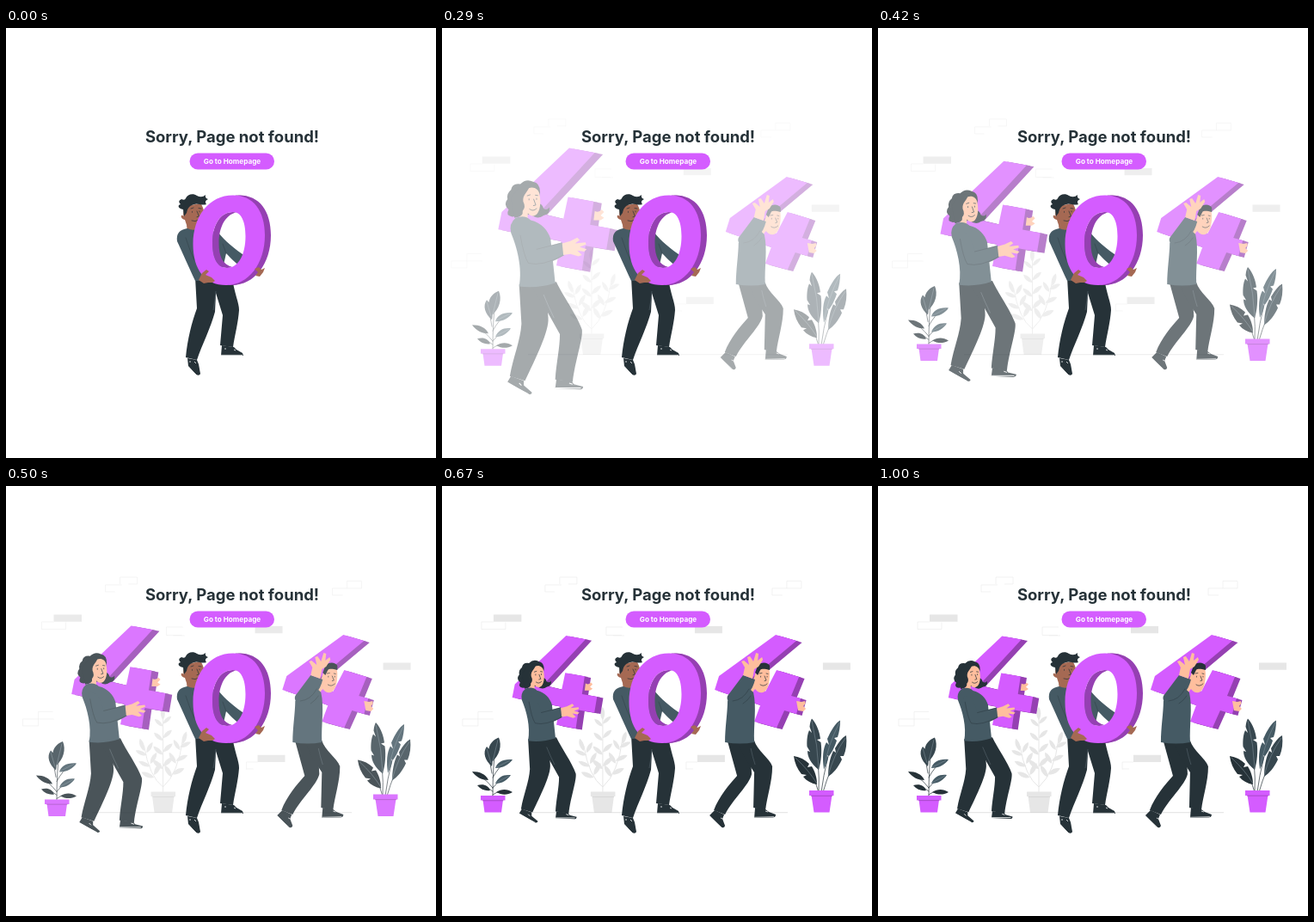
Animation of 500x500 px, one loop 1040 ms. Source, as an HTML page:

```html
<!DOCTYPE html>
<html lang="en">
<head>
<meta charset="utf-8">
<title>Page not found</title>
<style>
  html, body { margin: 0; width: 100%; height: 100%; overflow: hidden; background: #fff; }
  svg { display: block; width: 100vw; height: 100vh; }
  text { font-family: Inter, "Open Sans", sans-serif; font-weight: 700; text-anchor: middle; }
  .pink { fill: #d45cff; }
  .side { fill: #9540b2; }
  .dark { fill: #263238; }
  .knit { fill: #455a64; }
  .fold { fill: #37474f; }
  .skin { fill: #ffbe9d; }
  .brown { fill: #a56953; }
  .grey { fill: #e6e6e6; }
  .line { fill: none; stroke: #263238; stroke-width: .7; stroke-linecap: round; }
  .thin { fill: none; stroke: #e9e9e9; stroke-width: .6; }
  .vein { fill: none; stroke: #8797a0; stroke-width: .5; }
  .lace { fill: none; stroke: #fff; stroke-width: .8; }
</style>
</head>
<body>
<svg viewBox="0 0 500 500">
  <defs>
    <path id="four-a" d="M144 177L166 181 118 233 139 238 143 219 165 223 162 243 179 246 176 264 158 261 155 282 133 278 137 257 83 247 86 232Z"/>
    <path id="four-b" d="M387 173L411 180 350 231 375 239 388 214 414 222 405 244 416 247 411 265 397 261 388 281 362 274 369 255 316 237 321 221Z"/>
    <path id="zero" d="M264 194.5C288 194.5 301 213 301 241C301 274 282 299 256 299C231 299 217.5 281 217.5 251C217.5 219 236 194.5 264 194.5Z
      M264 214C249 214 240 229 240 250C240 268 246 279 257 279C270 279 278.5 264 278.5 242C278.5 224 273 214 264 214Z"/>
    <path id="rim" d="M264 194.5C288 194.5 301 213 301 241C301 274 282 299 256 299C272 290 287 270 287 241C287 217 279 202 264 194.5Z"/>
  </defs>

  <g id="scenery" class="fade">
    <path class="thin" d="M140 115H121v8h11M138 114v-8h20v8h-10M61 158H47v8.500h28v-8M43 271H25v8h18M43 271v-8.500h17M61 271h-18v8
      M211 164h-19v9.500h18M200 174h13M403 119h-18v8h12M402 119v-8.500h17M403 119h16v-8M298 321h-13v8.500M285 329h8"/>
    <path class="grey" d="M61 149.500h32.500v8.300H61ZM295 163h32v8.300h-32ZM444 205.500h32v8.300h-32ZM298 312.800h32v8.300h-32Z"/>
    <g id="shrub" class="grey">
      <path fill="none" stroke="#e6e6e6" d="M188 357V262M188 350Q172 338 166 302M188 350Q206 334 211 294"/>
      <path d="M174 355.500h28.500v5.500H201L198.500 380H178L175.500 361H174Z"/>
      <path d="M176 361.500h25" stroke="#cfcfcf" stroke-width=".6"/>
    </g>
  </g>
  <path class="fade thin" style="stroke:#cfcfcf" d="M100 379.700H402"/>

  <g id="plants" class="fade">
    <path class="line" d="M59 360Q59 325 62 305M59 350Q50 339 44 336M59 354Q52 348 46 348M59 338Q66 325 74 320M59 350Q66 341 74 338M59 358Q67 352 76 354M58 333Q56 320 54 314"/>
    <path class="fold" d="M58 320C51 308 54 296 66 291.500C70 301 67 312 58 320ZM58 325C50 318 47 309 52 302C58 308 60 316 58 325Z"/>
    <path class="knit" d="M62 327C64 320 71 316 82 317C78 323 71 327 62 327ZM62 345C65 337 72 334 80 335C76 341 70 345 62 345Z"/>
    <path class="dark" d="M54 341C47 341 40 338 35 331C44 331 51 334 54 341ZM56 353C51 354 45 352 41 347C48 345 54 347 56 353ZM63 355C69 351 76 351 82 355C75 359 69 358 63 355Z"/>
    <path class="vein" d="M59 319L65 294M57 321L52 304M63 326L79 318M63 344L78 336"/>
    <path class="pink" d="M45 359h28.500v5.500H45ZM47.500 364H71L69 378.500H49.500Z"/>
    <path class="line" style="stroke:#9540b2" d="M47.500 364.700H71"/>
    <path class="line" d="M438 355Q440 325 431 275M441 355Q446 315 461 277M443 355Q450 330 468 293M438 355Q432 330 411 315"/>
    <path class="fold" d="M438 329C429 322 425 314 425 307L428 308 424.500 302C424 294 425 287 427 283L430 286 427.500 279C428 274 429 271 430 269.500C436 276 439 285 440 293L436 294 440.500 297C442 308 441 319 438 329Z"/>
    <path class="knit" d="M444 328C442 315 443 304 447 297L450 300 448 293C452 284 457 275 463 271.500C463 279 462 285 460 291L456 292 459 295C456 304 453 309 450 313L448 312 449 315C448 320 446 325 444 328Z"/>
    <path class="fold" d="M449 337C449 326 451 315 455 307L458 309 457 304C462 296 466 291 470 289C471 298 470 306 467 313L463 313 465 317C461 326 455 333 449 337Z"/>
    <path class="dark" d="M436 346C430 345 424 342 420 337L424 335 418 334C413 328 410 321 409 313C416 314 422 317 427 322L425 326 430 325C434 332 436 338 436 346Z"/>
    <path class="vein" d="M438 328Q437 300 430 272M444 328Q448 302 462 274M449 336Q455 312 469 292M436 345Q427 330 411 315"/>
    <path class="pink" d="M427 353h28.500v6H427ZM429.500 358.500h24L450.500 378.500h-18Z"/>
    <path class="line" style="stroke:#9540b2" d="M429.500 359.200h24"/>
  </g>

  <g id="woman" class="fade">
    <g class="side"><use href="#four-a" x="7" y="1.500"/><use href="#four-a" x="3.500" y=".7"/></g>
    <use href="#four-a" class="pink"/>
    <path class="dark" d="M95 236Q89 235 92 230Q87 226 91 221Q90 216 94 213Q95 207 102 208Q107 203 113 206Q119 207 119 215L117 224Q121 225 122 229Q125 231 127 228Q128 234 122 235Q117 239 111 234Z"/>
    <path class="skin" d="M107 213C111 209 118 211 118.500 217C120 224 119 231 116 234C113 236.500 110 235 108.500 233L108 241 100 240 104 230C102 224 103 217 107 213Z"/>
    <path class="dark" d="M110 210C107 217 104 217 104.500 223Q107 228 104 231Q105 236 97 237L94 220 103 208Z"/>
    <path class="line" d="M109.500 220.700v.9M116 220.300v.9M113.500 221l1.800 5-2 .5M110 229.500Q113 232 116 229M108 218l2.500-.8M115 217.500l2 .3"/>
    <path class="dark" d="M101 294L124 294 126 323C127 334 115 358 106 377L93 373C96 356 102 343 103 328Z"/>
    <path class="dark" d="M110 294L133 292C138 303 151 321 155 333C156 341 149 360 147 378L132 376C133 361 136 349 136 337L122 312Z"/>
    <path class="vein" d="M122 303Q126 313 131 323" opacity=".6"/>
    <path class="knit" d="M98 237Q106 234 111 239C120 241 126 248 128 255L132 293Q117 298 101 296C104 280 99 262 94 250Q92 242 98 237Z"/>
    <path class="knit" d="M101 245C110 244 113 253 116 264L138 258 140 269C129 276 115 280 109 277C105 272 102 260 99 252Z"/>
    <path class="line" d="M102 252Q105 270 109 276Q121 279 139 269M116 264L136 259" opacity=".6"/>
    <path class="skin" d="M138 259L145 257 151 254 153 256 149 259 158 258 158.500 260 153 262 159 264 157 266 151 265 155 269 152 270 145 268 139 269ZM166 231Q169 233 172 230L174 232 171 235 174 237 171 239 165 239Z"/>
    <path class="dark" d="M94 373L105 377 105 381 112 387Q112 389 109 388.500L91 378Z"/>
    <path class="dark" d="M133 376L146 377 148 380 156 382Q156 384.500 153 384.500L132 383.500Z"/>
    <path class="lace" d="M91 379L109 388.500M132 383.200H154M101 379l2 2M144 379l3 1"/>
  </g>

  <g id="carrier">
    <path class="dark" d="M220 290L245 290 243 330C238 349 228 368 222 386L209 383C211 362 216 342 222 326Z"/>
    <path class="dark" d="M239 292L264 296C266 309 271 320 271 328C270 343 266 357 264 371L249 369 252 334Z"/>
    <path class="vein" d="M244 306Q243 318 241 328" opacity=".6"/>
    <path class="brown" d="M209 207C206 212 206 216 206.500 219C203 215 202 222 208 223L210 229 211 238 224 238 229 229C233 220 230 208 226 204Z"/>
    <path class="dark" d="M207 219L206 211C200 210 199 206 203 205Q199 201 204 199Q208 201 209 198C211 193 218 192 222 195Q228 198 232 194Q231 198 235 199Q230 201 233 205C227 207 223 203 219 205C214 206 211 209 210 215Z"/>
    <path class="line" d="M216.500 213.500v.8M225 213v.8M222 213l2.500 6-2.500 .7M215 210l3-1M224 209.500l3 .5M216 224Q220 226 224 223"/>
    <path class="knit" d="M211 233Q217 236 222 234L246 237C255 248 266 257 279 266L291 277 285 287C275 280 264 271 256 262L249 293 220 294C213 279 205 261 199 248Q197 235 211 233Z"/>
    <path class="line" d="M209 244Q213 257 219 270M256 262L252 251" opacity=".5"/>
    <path class="dark" d="M211 384L222 386 224 391 226 402Q225 405 221 403L212 393Z"/>
    <path class="dark" d="M251 369L265 371 268 374 275 378 276 381 250 381Z"/>
    <path class="lace" d="M211 393L222 404M250 380.400H275M219 388l2 2M254 373h2M265 374l2 1M213 388h2"/>
    <g class="side" fill-rule="evenodd">
      <use href="#rim" x="7"/><use href="#rim" x="5"/><use href="#rim" x="2.500"/>
      <path d="M264 214C249 214 240 229 240 250C240 268 246 279 257 279Q260 279 263 278C252 275 247.500 266 247.500 250C247.500 232 255 217 268 214.600Q266 214 264 214Z"/>
    </g>
    <use href="#zero" class="pink" fill-rule="evenodd"/>
    <path class="brown" d="M224 293L228 285 233 281 236 283 232 287 239 290 243 294 240 296 235 296 230 297ZM289 280L294 278 297 281 301 279 299 284 295 289 290 288 293 284Z"/>
  </g>

  <g id="lifter" class="fade">
    <g class="side"><use href="#four-b" x="6.500" y="2"/><use href="#four-b" x="3.200" y="1"/></g>
    <use href="#four-b" class="pink"/>
    <path class="dark" d="M331 297L357 297 359 335C356 348 338 363 328 382L315 377C321 361 333 347 342 337Z"/>
    <path class="dark" d="M342 297L362 296C365 307 380 317 383 326C383 344 377 360 375 377L361 374 362 333 351 316Z"/>
    <path class="vein" d="M358 305Q360 315 363 324" opacity=".6"/>
    <path class="skin" d="M367 208C374 205 380 210 380 218C380 226 379 235 374 239C370 242 365 239 363 236L359 241 353 233 361 225Z"/>
    <path class="dark" d="M363 217L366 209C370 204 378 205 380 209L380 214C375 213 371 212 369 214L366 220Z"/>
    <path class="line" d="M369.500 221.200v.9M377 221.200v.9M374 221l2 5-2 .6M369 231Q373 234 377 230M368 218l3-.5M376 218l2 .5"/>
    <path class="knit" d="M342 231Q355 233 361 240C365 258 361 278 362 298Q346 301 328 298C328 281 331 263 331 250Z"/>
    <path class="knit" d="M349 220L363 225C360 238 351 248 341 252C333 253 329 249 331 244Z"/>
    <path class="line" d="M337 250Q349 249 356 236M349 253Q355 249 358 244" opacity=".6"/>
    <path class="skin" d="M349 220L351 211 347 204 350 203 356 208 354 199 357 198 361 204 364 194 367 195 366 203 371 199 372 202 367 210 362 213 360 224ZM411 250L417 251 421 250 421.500 253 419 256 422 259 419 262 413 261Z"/>
    <path class="dark" d="M316 377L327 382 325 387 328 395Q327 398.500 323 396.500L310 383Z"/>
    <path class="dark" d="M363 374L375 376 379 379 387 382Q387 385 384 385.500L362 386Z"/>
    <path class="lace" d="M310 384L324 397M362 385.300L385 384.700M323 386l2 1M375 378l3 1"/>
  </g>

  <text x="263" y="133" font-size="18.500" class="dark">Sorry, Page not found!</text>
  <rect class="pink" x="213.500" y="145.500" width="98.500" height="19" rx="9.500"/>
  <text x="263" y="157.500" font-size="8.200" fill="#fff">Go to Homepage</text>
</svg>
<script>
const LOOP = 1040;
// [time, remaining offset]: everything settles, then eases back slightly
const KEYS = [[0, 1], [120, .95], [210, .89], [330, .614], [500, .274], [670, .056], [830, 0], [1000, .048], [1040, .07]];
const $ = id => document.getElementById(id);
const faded = document.querySelectorAll('.fade');

function leaf(x, y, angle, size) {
  const p = document.createElementNS('http://www.w3.org/2000/svg', 'path');
  p.setAttribute('d', 'M0 0C.3-.25 .75-.23 1 0C.7 .2 .3 .2 0 0Z');
  p.setAttribute('transform', `translate(${x} ${y}) rotate(${angle}) scale(${size})`);
  $('shrub').append(p);
}

function branch(x0, y0, x1, y1, pairs) {
  const lean = Math.atan2(y1 - y0, x1 - x0) * 180 / Math.PI;
  for (let i = 0; i < pairs; i++) {
    const k = (i + .3) / pairs, x = x0 + (x1 - x0) * k, y = y0 + (y1 - y0) * k;
    leaf(x, y, lean - 48, 16 - i);
    leaf(x, y - 3, lean + 48, 16 - i);
  }
  leaf(x1, y1 + 4, lean, 15);
}
branch(188, 334, 188, 268, 4);
branch(179, 343, 166, 304, 3);
branch(197, 343, 211, 296, 3);

// Cubic Hermite through the keys
function offsetAt(t) {
  let i = 0;
  while (i < KEYS.length - 2 && t >= KEYS[i + 1][0]) i++;
  const slope = j => {
    const a = KEYS[Math.max(j - 1, 0)], b = KEYS[Math.min(j + 1, KEYS.length - 1)];
    return (b[1] - a[1]) / (b[0] - a[0]);
  };
  const [t0, v0] = KEYS[i], [t1, v1] = KEYS[i + 1], d = t1 - t0, s = (t - t0) / d, r = 1 - s;
  return r * r * ((1 + 2 * s) * v0 + s * d * slope(i)) + s * s * ((3 - 2 * s) * v1 - r * d * slope(i + 1));
}

function draw(now) {
  const t = now % LOOP, u = offsetAt(t);
  const move = (id, value) => $(id).setAttribute('transform', value);
  const opacity = Math.min(1, Math.max(0, (t - 85) / 500));
  faded.forEach(el => el.setAttribute('opacity', opacity));
  move('scenery', `translate(${-20 * u} 0)`);
  move('plants', `translate(0 ${20 * u})`);
  move('lifter', `translate(${19.5 * u} 0)`);
  move('woman', `translate(133 283) scale(${1 + u / 2}) translate(-133 -283)`);
}

const start = performance.now();
function tick() {
  draw(performance.now() - start);
  requestAnimationFrame(tick);
}
tick();
</script>
</body>
</html>
```
